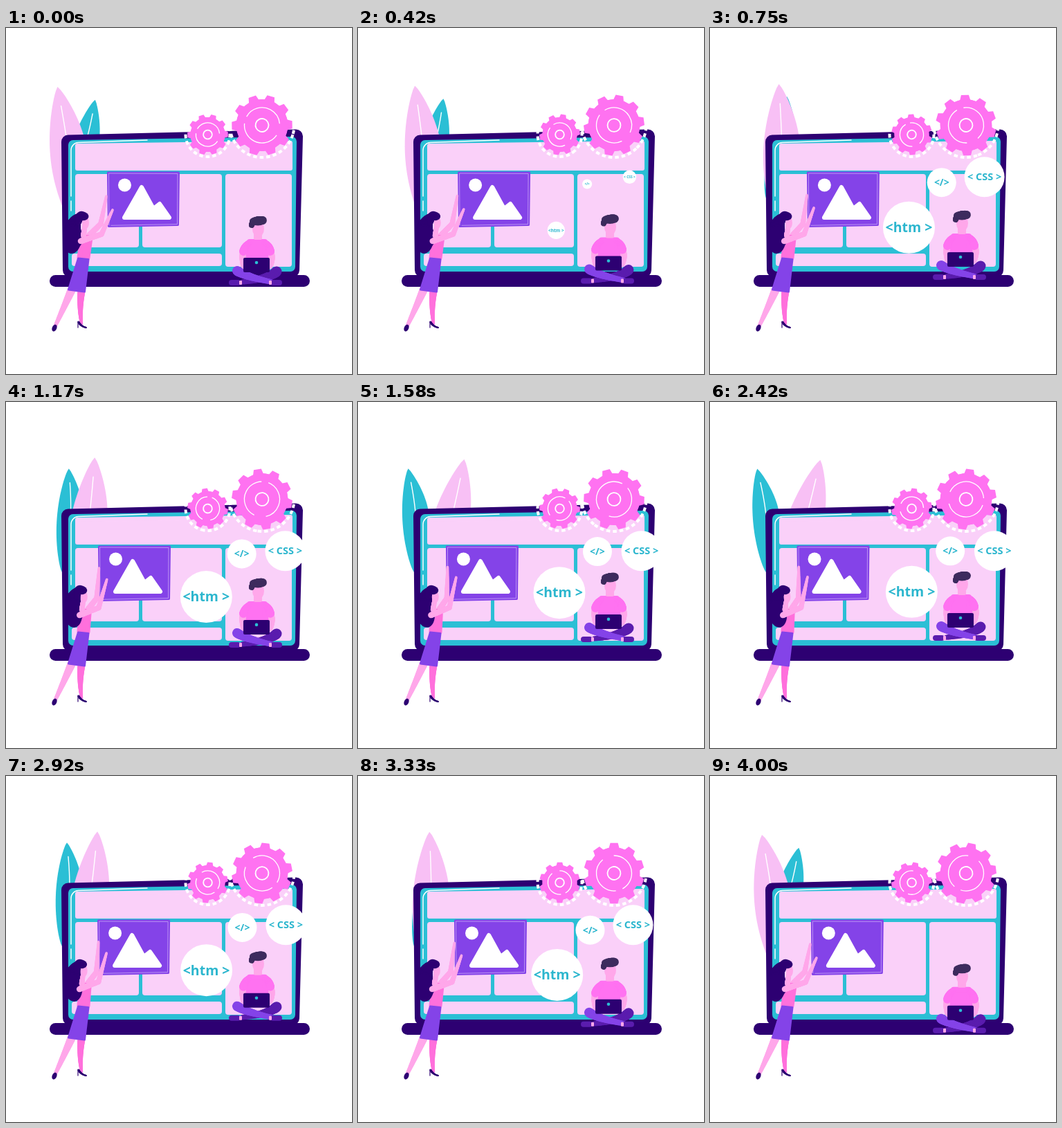
Recreate the animation shown at these times as an HTML page with a canvas. Size 500 by 500 pixels, loop 4080 ms.

```html
<!DOCTYPE html>
<html lang="en">
<head>
<meta charset="utf-8">
<title>Web design</title>
<style>
html, body { margin: 0; width: 100%; height: 100%; overflow: hidden; background: #fff; }
canvas { display: block; width: 500px; height: 500px; }
</style>
</head>
<body>
<canvas id="stage" width="500" height="500"></canvas>
<script>
const ctx = document.getElementById('stage').getContext('2d');
const LOOP = 4080, STEP = 250 / 3, FRAMES = 49, LAG = 30, TAU = Math.PI * 2;
const INK = '#2d0072', TEAL = '#2bbfd5', PALE = '#fad0f9', LEAF = '#f8c0f5',
  PINK = '#ff72f1', VIOLET = '#8443e8', PLUM = '#5a1cae', SKIN = '#ffa7ea',
  BLUSH = '#ff70dc', HAIR = '#3d2b5e', WHITE = '#fff';

const clamp = v => Math.max(0, Math.min(1, v));
const ease = v => v * v * (3 - 2 * v);
const mix = (a, b, p) => a + (b - a) * p;
const between = (a, b, p) => [mix(a[0], b[0], p), mix(a[1], b[1], p)];
const radians = degrees => degrees * TAU / 360;
const range = (n, f) => Array.from({ length: n }, (_, i) => f(i));

function fill(color) {
  ctx.fillStyle = color;
  ctx.fill();
}

function stroke(color, width) {
  ctx.strokeStyle = color;
  ctx.lineWidth = width;
  ctx.lineCap = ctx.lineJoin = 'round';
  ctx.stroke();
}

function trace(points) {
  ctx.beginPath();
  points.forEach(point => ctx.lineTo(...point));
}

function poly(color, points) {
  trace(points);
  fill(color);
}

function line(color, width, points) {
  trace(points);
  stroke(color, width);
}

// Polygon with corners rounded by r; points lie r inside the outline.
function slab(color, points, r) {
  trace(points);
  ctx.closePath();
  fill(color);
  stroke(color, 2 * r);
}

function oval(color, x, y, rx, ry = rx, angle = 0) {
  ctx.beginPath();
  ctx.ellipse(x, y, rx, ry, angle, 0, TAU);
  fill(color);
}

function box(color, x, y, right, bottom, r) {
  ctx.beginPath();
  ctx.roundRect(x, y, right - x, bottom - y, r);
  fill(color);
}

// Curved, tapering limb from a to c that bends towards b.
function limb(color, a, b, c, startWidth, endWidth) {
  const n = 24;
  for (let i = 0; i < n; i++) {
    const [u, v] = [i / n, (i + 1) / n];
    const at = s => between(between(a, b, s), between(b, c, s), s);
    line(color, mix(startWidth, endWidth, u), [at(u), at(v)]);
  }
}

function placed(x, y, draw, angle = 0, scale = 1) {
  ctx.save();
  ctx.translate(x, y);
  ctx.rotate(angle);
  ctx.scale(scale, scale);
  draw();
  ctx.restore();
}

function drawLeaf(color, x, y, degrees, length, width, lean, bulge) {
  const n = 40;
  const mid = u => bulge * Math.sin(Math.PI * u) - lean * (1 - u);
  const half = u => width * Math.pow(Math.max(0, Math.sin(Math.PI * u)), 0.8);
  const side = sign => range(n + 1, i => [mid(i / n) + sign * half(i / n), -length * i / n]);
  placed(x, y, () => {
    poly(color, [...side(-1), ...side(1).reverse()]);
    line(WHITE, 1.4, range(n, i => mix(0.3, 0.88, i / n)).map(u => [mid(u), -length * u]));
  }, radians(degrees));
}

function drawLaptop() {
  slab(INK, [[90, 164.5], [419, 156.5], [414, 350], [92, 350]], 10);
  slab(TEAL, [[97, 169], [413, 164], [411, 345], [97, 345]], 7);
  slab(PALE, [[103, 170], [411, 166], [411, 203], [103, 203]], 3);
  box(PALE, 100, 211, 192, 317, 4);
  box(PALE, 197, 211, 312, 317, 4);
  box(PALE, 317, 211, 413, 345, 4);
  box(PALE, 95, 326, 312, 344, 4);
  line(WHITE, 1.5, [[94, 264], [94, 250]]);
  ctx.beginPath();
  ctx.moveTo(94, 243);
  ctx.arcTo(94, 166, 204, 162, 11);
  ctx.lineTo(204, 162);
  stroke(WHITE, 1.5);
  box(INK, 63, 357, 439, 374, 8.5);
}

function drawGear(x, y, r, angle) {
  const teeth = 10, root = r * 0.85;
  const ring = (radius, width, from = 0, to = TAU) => {
    ctx.beginPath();
    ctx.arc(0, 0, radius, from, to);
    ctx.strokeStyle = WHITE;
    ctx.lineWidth = width;
    ctx.lineCap = 'butt';
    ctx.stroke();
  };
  const tooth = i => [[root, -0.2], [r, -0.125], [r, 0.125], [root, 0.2]].map(([d, offset]) => {
    const a = i * TAU / teeth + offset;
    return [d * Math.sin(a), -d * Math.cos(a)];
  });
  placed(x, y, () => {
    ctx.setLineDash([5.5, 4]);
    ring(r + 2.5, 4);
    ctx.setLineDash([]);
    poly(PINK, range(teeth, tooth).flat());
    oval(PINK, 0, 0, root);
    ring(r * 0.58, 1.3, 0.3, 2.95);
    ring(r * 0.58, 1.3, 3.35, 5.9);
    ring(r * 0.215, 1.8);
  }, angle);
}

function drawPicture(dx) {
  placed(dx, 0, () => {
    slab(VIOLET, [[147.5, 209], [249.5, 209], [248.5, 284.5], [148.5, 286.5]], 1.5);
    line('#c9a4f6', 0.8, [[149, 285], [148.5, 210], [248, 210.5], [247.5, 283.5], [152, 285.3]]);
    oval(WHITE, 171.5, 227, 9.5);
    slab(WHITE, [[171, 274], [196, 230], [213, 261], [222, 254], [236, 274]], 3);
  });
}

function drawArm(shoulder, elbow, hand) {
  limb(SKIN, shoulder, between(shoulder, elbow, 0.5), elbow, 8.5, 7.5);
  limb(SKIN, elbow, between(elbow, hand, 0.5), hand, 7.5, 3.5);
}

function drawWoman(p) {
  limb(SKIN, [95, 378], [84, 403], [71, 431], 12, 5);
  limb(BLUSH, [109, 380], [106, 405], [109, 427], 11, 4);
  oval(INK, 70, 433.5, 3.3, 5.2, 0.4);
  limb(INK, [105, 425], [108, 431], [116, 433], 3, 2);
  line(INK, 1.2, [[104, 424], [104, 433]]);

  const lean = -3 * p;
  drawArm([120 + lean, 300], between([137, 283], [127, 284], p), between([145, 243], [127, 238], p));
  slab(BLUSH, [[110 + lean, 302], [122 + lean, 303], [118, 332], [106, 332]], 3.5);
  slab(VIOLET, [[104.5, 333], [119, 334.5], [113.5, 381], [90.5, 378]], 1.5);

  limb(INK, [106 + lean, 274], [93, 282], [97 + p, 305], 13, 29);
  oval(INK, 96 + 2 * p, 306, 13, 20, 0.1 - 0.3 * p);
  placed(lean * 1.25, 0, () => {
    limb(SKIN, [114, 285], [113, 292], [112, 300], 6, 8);
    oval(SKIN, 115, 281.5, 5, 9);
    oval(INK, 110.5, 271.5, 9, 6.5, 0.2);
    oval(INK, 105.5, 277, 5, 9, 0.2);
  });
  drawArm([108 + lean, 308], between([138, 298], [131, 297], p), between([154, 263], [140, 252], p));
}

function drawMan(lift) {
  placed(0, -lift, () => {
    limb(SKIN, [344, 322], [341, 332], [344, 344], 11, 9);
    limb(SKIN, [381, 322], [386, 332], [381, 344], 11, 9);
    slab(PINK, [[352, 309], [374, 309], [376, 343], [350, 343]], 4);
    limb(PINK, [352, 310], [345, 314], [343, 323], 8, 12);
    limb(PINK, [374, 310], [381, 314], [382, 323], 8, 12);
    slab(SKIN, [[360, 296], [368, 296], [368, 304], [360, 304]], 2);
    oval(SKIN, 364.5, 290, 8.5, 12);
    limb(HAIR, [355, 285], [357, 276], [371, 278], 8, 12);
    oval(HAIR, 364, 279, 12, 6.5);

    limb(PLUM, [391, 352], [380, 362], [342, 367], 15, 7);
    limb(VIOLET, [334, 351], [348, 360], [384, 367], 14, 7);
    for (const [left, ankle] of [[322, 337], [382, 380]]) {
      box(PLUM, left, 364, left + 17, 372, 4);
      box(SKIN, ankle, 365, ankle + 4, 371, 1);
    }
    box(INK, 343, 332, 381, 353, 2);
    oval(TEAL, 362, 339, 2.3);
  });
}

function drawBubble(label, x, y, r, size, scale) {
  placed(x, y, () => {
    oval(WHITE, 0, 0, r);
    ctx.fillStyle = '#2bb6ce';
    ctx.font = `bold ${size}px "Open Sans", "Noto Sans", sans-serif`;
    ctx.textAlign = 'center';
    ctx.fillText(label, 0, size * 0.35);
  }, 0, scale);
}

function render(time) {
  const frame = Math.min(FRAMES - 1, Math.floor((time % LOOP + 3.5) / STEP));
  const t = frame * STEP;
  const swing = Math.cos(TAU * (t - LAG) / LOOP), p = (1 - swing) / 2;
  const turn = radians(17 + 288 * frame / FRAMES);
  const bubbleScale = ease(clamp((t - 300) / 300)) * ease(clamp((3800 - t) / 300));

  ctx.fillStyle = WHITE;
  ctx.fillRect(0, 0, 500, 500);
  drawLeaf(TEAL, 81, 246, 6 + 12.6 * swing, 150, 19.5, 0, 7);
  drawLeaf(LEAF, 120, 289, -12.6 * swing, 209, 27, 20, 4);
  drawLaptop();
  drawGear(291.5, 154, 29.5, turn);
  drawGear(370, 140.5, 44, turn);
  drawPicture(-11 * (1 - swing));
  drawWoman(p);
  drawMan(29 * p);
  if (bubbleScale > 0) {
    drawBubble('<htm >', 288.8 - 3 * swing, 283.5 + 10.7 * swing, 37.5, 19.5, bubbleScale);
    drawBubble('</>', 339 - 9.5 * swing, 220.5 + 6 * swing, 21, 14, bubbleScale);
    drawBubble('< CSS >', 401.5 - 11 * swing, 215.3, 29, 14.5, bubbleScale);
  }
}

const start = performance.now();
function tick() {
  render(performance.now() - start);
  requestAnimationFrame(tick);
}
tick();
</script>
</body>
</html>
```
